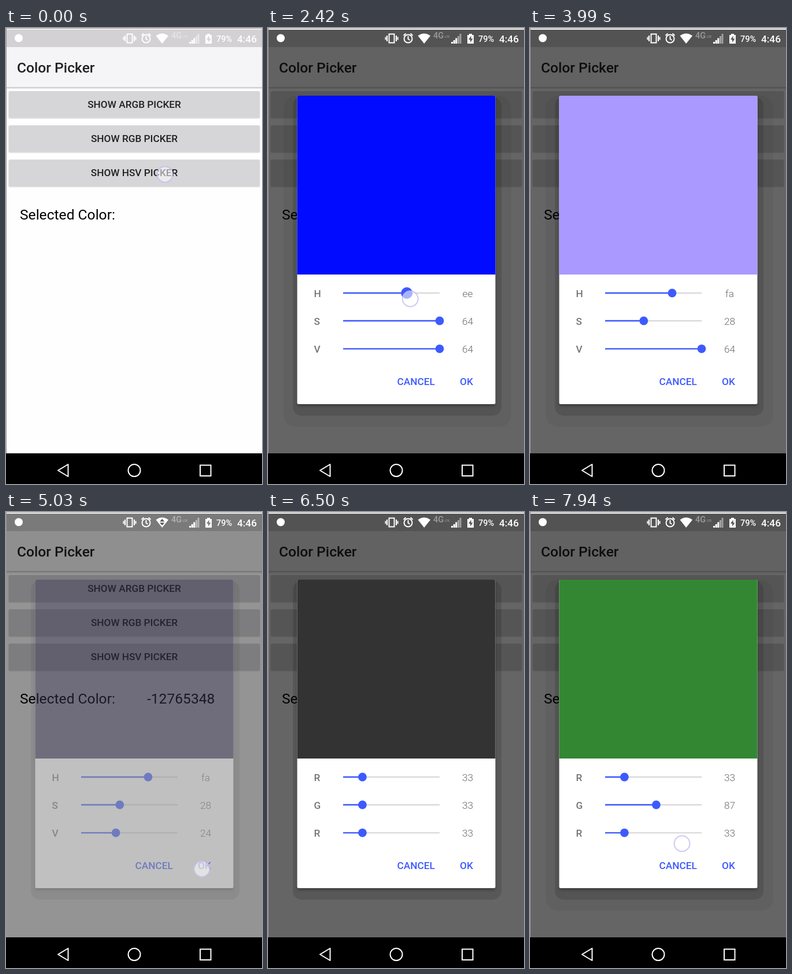
Recreate the animation shown at these times as an HTML page. Size 443x788 px, loop 8 s.

```html
<!DOCTYPE html>
<html lang="en">
<head>
<meta charset="utf-8">
<title>Color Picker</title>
<style>
html, body { margin: 0; height: 100%; overflow: hidden; background: #fff; }
svg { display: block; width: 443px; height: 788px; }
text { font: 17.23px Roboto, sans-serif; }
.med { font-weight: 500; }
.big { font-size: 24.6px; }
.mid { text-anchor: middle; }
.val { font-weight: 300; fill: #6a6a6a; text-anchor: middle; }
.act { font-weight: 500; fill: #3d5afe; }
.line { fill: none; stroke: #fff; stroke-width: 2; }
</style>
</head>
<body>
<svg viewBox="0 0 443 788">
  <defs>
    <filter id="soft" x="-10%" y="-10%" width="120%" height="120%"><feGaussianBlur stdDeviation="2.5"/></filter>
    <linearGradient id="fall" x2="0" y2="1">
      <stop stop-opacity=".24"/><stop offset="1" stop-opacity="0"/>
    </linearGradient>
  </defs>

  <!-- main screen -->
  <rect width="443" height="788" fill="#fefefe"/>
  <rect y="3" width="443" height="30" fill="#d3d1d4"/>
  <rect y="33" width="443" height="69" fill="#f5f5f7"/>
  <rect y="102" width="443" height="4" fill="url(#fall)"/>
  <text class="med big" x="19" y="77" fill="#212121">Color Picker</text>
  <g id="buttons"></g>
  <text class="big" x="24" y="331">Selected Color:</text>
  <text class="big" x="244" y="331" id="picked">-12765348</text>
  <rect id="dim" y="3" width="443" height="732"/>

  <!-- dialog -->
  <g id="dialog">
    <path id="halo" d="M27 145V665Q27 689 51 689H397Q421 689 421 665V145Q421 117 397 117H51Q27 117 27 145" opacity=".05"/>
    <rect x="43" y="119" width="361" height="551" rx="15" opacity=".13"/>
    <rect x="51" y="120" width="342" height="533" opacity=".3" filter="url(#soft)"/>
    <rect x="50.5" y="117" width="343" height="533" rx="2.5" fill="#fff"/>
    <path id="swatch" d="M50.5 426V119.5Q50.5 117 53 117H391Q393.500 117 393.500 119.500V426Z"/>
    <g id="rows"></g>
    <text class="act" x="223.500" y="617">CANCEL</text>
    <text class="act" x="332" y="617">OK</text>
  </g>
  <circle id="touch" r="13.500" fill="#fff" fill-opacity=".55" stroke="#c3bdec" stroke-opacity=".8" stroke-width="2"/>

  <!-- status bar -->
  <rect width="443" height="3" fill="#ececec"/>
  <rect width="443" height="1" fill="#aaa"/>
  <circle cx="22" cy="17.500" r="7" fill="#fff"/>
  <path class="line" d="M209.500 10.500h9v15h-9zM206 13v10M222 13v10M203.500 15.500v5M224.500 15.500v5"/>
  <g class="line" stroke-width="1.800">
    <circle cx="242.500" cy="18.500" r="7"/>
    <path d="M242.500 14v5l3 2M234.500 13l4-3.500M250.500 13l-4-3.500"/>
  </g>
  <path d="M259.500 13.500Q270.200 5.500 281 13.500L270.200 27Z" fill="#fff"/>
  <path id="arrows" d="M266 16.500l4.200-4.500 4.200 4.500zM266 18.500h8.400l-4.200 4.500z" fill="#555"/>
  <g fill="#fff" opacity=".42">
    <text x="286" y="18" class="med" style="font-size:14.500px">4G</text>
    <text x="306" y="17" class="med" style="font-size:5px">LTE</text>
  </g>
  <path d="M317 27v-3h3v3zM320.700 27v-6h3v6zM324.300 27v-9.500h3v9.500z" fill="#fff"/>
  <path d="M328 27v-13h3v13zM331.500 27v-17h3v17z" fill="#fff" opacity=".45"/>
  <path d="M345 12h3v-2h5v2h3v15h-11zM351.500 13.500l-4.500 6.500h3v5l4.500-6.500h-3z" fill="#fff" fill-rule="evenodd"/>
  <text class="med" x="364" y="23.500" fill="#fff" style="font-size:14.500px">79%</text>
  <text class="med" x="400" y="24.500" fill="#fff">4:46</text>

  <!-- navigation bar -->
  <rect y="735" width="443" height="53"/>
  <path class="line" d="M90 764.500L107.500 754V775Z" stroke-linejoin="round"/>
  <circle class="line" cx="222" cy="764.500" r="10.500"/>
  <rect class="line" x="336" y="755.500" width="18.500" height="18.500"/>
  <rect width="1" height="735" fill="#999"/>
</svg>
<script>
const $ = id => document.getElementById(id);
const clamp = v => Math.max(0, Math.min(1, v));
const ramp = (t, a, b) => clamp((t - a) / (b - a));
const mix = (a, b, p) => a + (b - a) * p;
const smooth = p => p * p * (3 - 2 * p);
const LEFT = 130, SPAN = 167;

$('buttons').innerHTML = ['ARGB', 'RGB', 'HSV'].map((name, i) => {
  const y = 109 + i * 59.2;
  return `<rect x="4" y="${y}" width="436" height="48" rx="3" opacity=".09"/>
    <rect x="5" y="${y}" width="434" height="46.500" rx="2" fill="#d6d5d8"/>
    <rect class="press" x="5" y="${y}" width="434" height="46.500" rx="2" opacity="0"/>
    <text class="med mid" x="222" y="${y + 29}" fill="#212121">SHOW ${name} PICKER</text>`;
}).join('');

$('rows').innerHTML = [458, 506, 554.3].map(y =>
  `<text class="med" x="79.500" y="${y + 6.700}" fill="#757575"></text>
  <path d="M${LEFT} ${y}h${SPAN}" stroke="#dadada" stroke-width="2.300"/>
  <path class="fill" stroke="#3d5afe" stroke-width="2.300"/>
  <circle cy="${y}" fill="#3d5afe"/>
  <text class="val" x="345.500" y="${y + 7}"></text>`).join('');

const pick = sel => [...$('rows').querySelectorAll(sel)];
const labels = pick('.med'), fills = pick('.fill'), thumbs = pick('circle'), values = pick('.val');
const presses = document.querySelectorAll('.press');

function hsv(h, s, v) {
  const part = n => {
    const k = (n + h / 60) % 6;
    return Math.round(255 * v * (1 - s * Math.max(0, Math.min(k, 4 - k, 1))));
  };
  return [part(5), part(3), part(1)];
}

function setRow(i, label, value, max, held) {
  const x = LEFT + SPAN * value / max, y = thumbs[i].getAttribute('cy');
  labels[i].textContent = label;
  values[i].textContent = Math.round(value).toString(16);
  fills[i].setAttribute('d', `M${LEFT} ${y}H${x}`);
  thumbs[i].setAttribute('cx', x);
  thumbs[i].setAttribute('r', mix(7.4, 10, held));
  return x;
}

// visibility of something that fades in at a and out again before b
const shown = (t, a, b, fade = 80) => Math.min(ramp(t, a, a + fade), 1 - ramp(t, b - fade, b));

function draw(t) {
  const first = t < 5500;
  const open = first ? ramp(t, 1220, 1440) : ramp(t, 6200, 6420);
  const close = first ? 1 - ramp(t, 4920, 5110) : 1;
  const undim = first ? 1 - ramp(t, 4945, 5160) ** 1.3 : 1;
  $('dim').setAttribute('opacity', .6 * open * undim);
  $('dialog').setAttribute('opacity', open * close);
  $('halo').setAttribute('opacity', (first ? t > 1800 && t < 4920 : t > 6600) ? .05 : 0);
  $('picked').setAttribute('opacity', t > 4920 ? 1 : 0);
  $('arrows').setAttribute('opacity', t > 2680 && t < 3380 || t > 4400 && t < 6100 ? 1 : 0);
  presses[2].setAttribute('opacity', .12 * shown(t, 1060, 1400));
  presses[1].setAttribute('opacity', .12 * shown(t, 5980, 6350));

  // each touch: start, end, x, y
  let touches, rgb;
  if (first) {
    const h = mix(56, 250, smooth(ramp(t, 1880, 2520)));
    const s = mix(100, 40, 1 - (1 - ramp(t, 2690, 3600)) ** 1.3);
    const v = mix(100, 36, smooth(ramp(t, 4120, 4520)));
    const hx = setRow(0, 'H', h, 360, shown(t, 1800, 2620));
    const sx = setRow(1, 'S', s, 100, shown(t, 2640, 3800));
    const vx = setRow(2, 'V', v, 100, shown(t, 4040, 4630));
    rgb = hsv(h, s / 100, v / 100);
    touches = [
      [-200, 1220, 275, 253],
      [1800, 2620, hx + 6, 468],
      [2640, 3800, sx - 10 * ramp(t, 2690, 2800), 516],
      [4040, 4630, vx - 6, 563],
      [4900, 5130, 339, 617]
    ];
  } else {
    const g = mix(51, 135, smooth(ramp(t, 6940, 7500)));
    setRow(0, 'R', 51, 255, 0);
    const gx = setRow(1, 'G', g, 255, shown(t, 6870, 7600));
    setRow(2, 'R', 51, 255, 0);
    rgb = [51, Math.round(g), 51];
    touches = [
      [5980, 6200, 275, 195],
      [6870, 7600, gx + 6, 518],
      [7600, 8200, mix(159, 263, ramp(t, 7660, 7940)), 573]
    ];
  }
  $('swatch').setAttribute('fill', `rgb(${rgb})`);

  const now = touches.find(([a, b]) => t >= a && t < b);
  $('touch').setAttribute('opacity', now ? shown(t, now[0], now[1], 100) : 0);
  if (now) $('touch').setAttribute('transform', `translate(${now[2]} ${now[3]})`);
}

function tick() {
  draw(performance.now() % 8000);
  requestAnimationFrame(tick);
}
tick();
</script>
</body>
</html>
```
